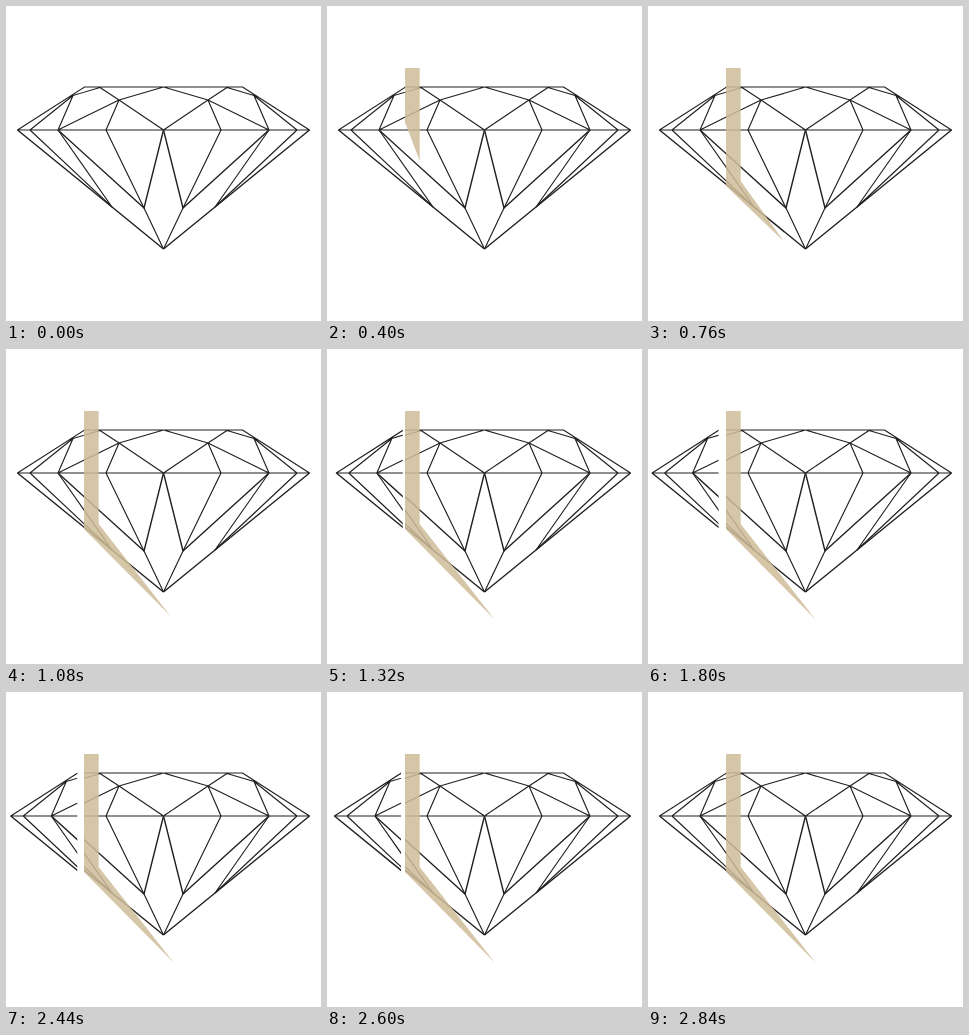
Animation, 315 px wide and 315 px high, one loop 2.88 s. Source, as an HTML page:

```html
<!DOCTYPE html>
<html lang="en">
<head>
<meta charset="utf-8">
<title>Diamond cut</title>
<style>
  html, body { margin: 0; height: 100%; overflow: hidden; background: #fff; }
  svg { display: block; width: 100%; height: 100%; }
</style>
</head>
<body>
<svg viewBox="0 0 315 315">
  <defs>
    <clipPath id="leftClip"><path d="M0 0H78V315H0Z"/></clipPath>
    <clipPath id="rightClip"><path d="M78 0H315V315H78Z"/></clipPath>
    <g id="half" stroke-width="1.15">
      <path d="M157.5 81H78.5L11.5 124H157.5M24 124L67 89.5L52 124L113 94L157.5 81M67 89.5L94 81.5L113 94L157.5 124M113 94L100 124L138 202L157.5 243"/>
      <path d="M24 124L106 201L52 124" />
      <path d="M11.5 124L157.5 243M52 124L138 202L157.5 124" stroke-width="1.4"/>
    </g>
    <g id="diamond" fill="none" stroke="#231f20" stroke-linejoin="round">
      <use href="#half"/>
      <use href="#half" transform="translate(315) scale(-1 1)"/>
    </g>
  </defs>
  <g id="slice"><use href="#diamond" clip-path="url(#leftClip)"/></g>
  <use href="#diamond" clip-path="url(#rightClip)"/>
  <polygon id="beam" fill="#cfbd99" fill-opacity=".85"/>
</svg>
<script>
const LOOP = 2880, STEP = 40;
const TOP = 62, LEFT = 78, RIGHT = 92.7, BEND = 175;
const slice = document.getElementById('slice');
const beam = document.getElementById('beam');

const progress = (t, from, to) => Math.min(1, Math.max(0, (t - from) / (to - from)));
const mix = (a, b, p) => a + (b - a) * p;

function beamPoints(t) {
  const enter = progress(t, 0, 560);
  const turn = progress(t, 560, 760);
  const leave = progress(t, 760, 1120);
  let tipY = mix(TOP, 192, enter);
  let tipX = RIGHT + Math.max(0, tipY - BEND) * 0.37;
  tipX = mix(mix(tipX, 136, turn), 168, leave);
  tipY = mix(mix(tipY, 235.5, turn), 271, leave);
  const leftY = mix(mix(TOP, 138, enter), 180, turn);
  return [LEFT, TOP, RIGHT, TOP, RIGHT, Math.min(BEND, tipY), tipX, tipY, LEFT, leftY];
}

function draw(now) {
  const t = Math.floor((now % LOOP) / STEP) * STEP;
  const shift = 7.4 * (progress(t, 1120, 1800) - progress(t, 2400, 2840));
  beam.setAttribute('points', beamPoints(t).join(' '));
  slice.setAttribute('transform', `translate(${-shift})`);
}

const start = performance.now();
function tick() {
  draw(performance.now() - start);
  requestAnimationFrame(tick);
}
tick();
</script>
</body>
</html>
```
